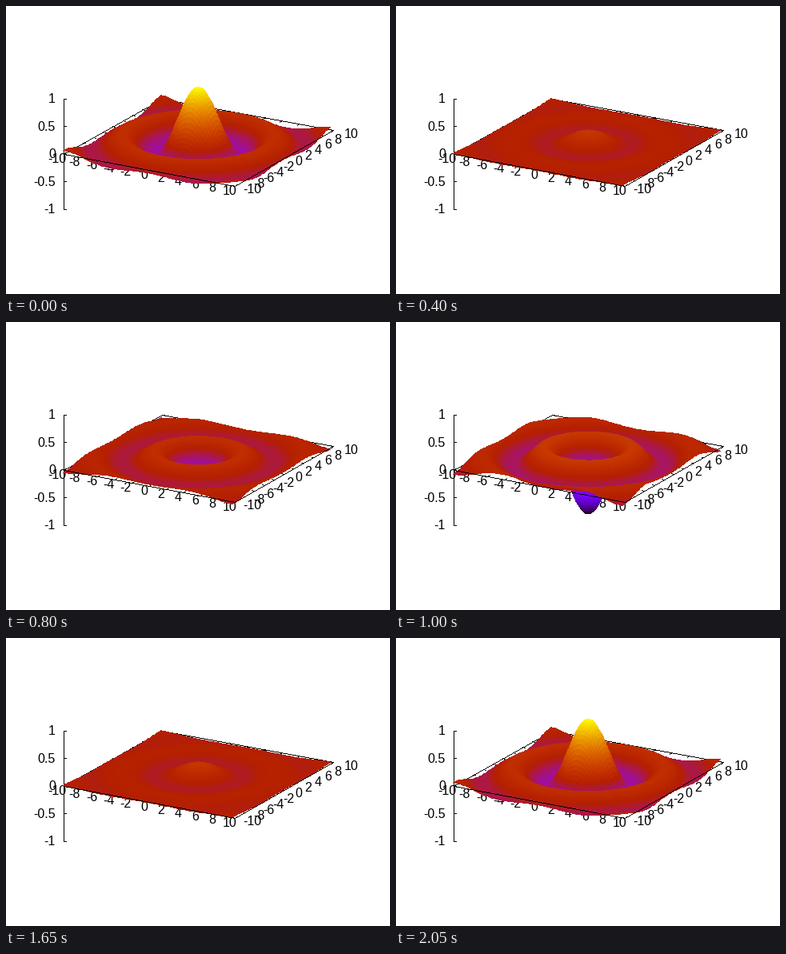
These frames come from a looping animation (480 px wide and 360 px high, 2100 ms). A matplotlib script:

```python
import numpy as np
import matplotlib.pyplot as plt
from matplotlib.animation import ArtistAnimation

W, H, DPI = 480, 360, 80
PX = 72 / DPI                       # one pixel in points
ORIGIN = np.array([71.6, 184.74])   # screen place of (-10, -10, 0)
XVEC = np.array([214.0, 39.9])      # x from -10 to 10
YVEC = np.array([123.6, -69.2])     # y from -10 to 10
ZLEN = 69.0                         # one unit of height
TICK = 3
STEPS = 21
SUB = 10                            # sample points along a cell edge
BACK, SURFACE, FRONT = 1, 2, 3

plt.rcParams["font.family"] = "Liberation Sans"
fig = plt.figure(figsize=(W / DPI, H / DPI), dpi=DPI, facecolor="white")
ax = fig.add_axes([0, 0, 1, 1])
ax.axis("off")


def project(x, y, z=0.0):
    u, v = (x + 10) / 20, (y + 10) / 20
    return (ORIGIN[0] + XVEC[0] * u + YVEC[0] * v,
            ORIGIN[1] + XVEC[1] * u + YVEC[1] * v - ZLEN * z)


def nearest(a):
    return np.floor(np.asarray(a) + 0.5).astype(int)


def show(layer, zorder):
    return ax.imshow(layer, extent=(0, W, H, 0), aspect="auto",
                     interpolation="nearest", zorder=zorder)


def palette(gray):
    g = np.clip(gray, 0, 1)
    blue = np.clip(np.sin(2 * np.pi * g), 0, 1)
    return np.stack([np.sqrt(g), g ** 3, blue, np.ones_like(g)], axis=-1)


def line(layer, p, q):
    """Hard one-pixel black line."""
    (x0, y0), (x1, y1) = nearest(p), nearest(q)
    n = max(abs(x1 - x0), abs(y1 - y0)) + 1
    layer[nearest(np.linspace(y0, y1, n)),
          nearest(np.linspace(x0, x1, n)), 3] = 1


def tick(layer, p, direction):
    d = direction / np.hypot(*direction) * TICK
    line(layer, p, (p[0] + d[0], p[1] + d[1]))


def label(x, y, value, ha):
    # Non-negative numbers carry a leading blank, as in "% h".
    blank = 2.7 if value >= 0 else 0
    x += {"left": blank, "center": blank / 2, "right": 0}[ha]
    ax.text(x, nearest(y + 5.5), f"{value:g}", size=16 * PX, ha=ha,
            va="baseline", color="black", zorder=BACK + 0.5)


def draw_box():
    rear, fore = np.zeros((2, H, W, 4))
    left, front = project(-10, -10), project(10, -10)
    right, back = project(10, 10), project(-10, 10)
    line(rear, left, back)
    line(rear, back, right)
    line(fore, left, front)
    line(fore, front, right)
    line(rear, project(-10, -10, -1), project(-10, -10, 1))

    for n in range(-10, 11, 2):
        px, py = project(n, -10)
        tick(rear, (px, py), YVEC)
        tick(rear, project(n, 10), -YVEC)
        label(px - 7.5, py + 5.76, n, "center")

        px, py = project(10, n)
        tick(rear, (px, py), -XVEC)
        tick(rear, project(-10, n), XVEC)
        label(px + 10.8, py + 3.65, n, "left")

    for z in np.linspace(-1, 1, 5):
        px, py = project(-10, -10, z)
        tick(rear, (px, py), np.array([1.0, 0.0]))
        label(62, py, z, "right")

    show(rear, BACK)
    show(fore, FRONT)


def corners(a):
    """The four corner values of every grid cell."""
    return a[:-1, :-1], a[:-1, 1:], a[1:, :-1], a[1:, 1:]


def spread(a):
    """Sample points across every cell, cell after cell."""
    p, q, r, s = (c[..., None, None] for c in corners(a))
    t = np.linspace(0, 1, SUB, dtype=np.float32)
    u, v = t[None, :], t[:, None]
    return nearest((p * (1 - u) + q * u) * (1 - v)
                   + (r * (1 - u) + s * u) * v).ravel()


# Rows run from the far side to the near side, so near cells paint last.
axis = np.arange(-10, 10, 0.2)
X, Y = np.meshgrid(axis, axis[::-1])
RIPPLE = np.sinc(np.hypot(X, Y) / np.pi)
CELLS = np.repeat(np.arange((len(axis) - 1) ** 2), SUB * SUB)


def surface(amp):
    z = amp * RIPPLE
    px, py = project(X, Y, z)
    # Cell corners sit on whole pixels.
    px = np.floor(px).astype(np.float32)
    py = np.floor(py + 0.5).astype(np.float32)
    owner = np.full((H, W), -1)
    owner[spread(py), spread(px)] = CELLS
    colors = palette((sum(corners(z)) / 4 + 1) / 2).reshape(-1, 4)
    layer = colors[owner]
    layer[owner < 0] = 0
    return show(layer, SURFACE)


draw_box()
frames = [[surface(a)] for a in np.linspace(1, -1, STEPS)]
ax.set_xlim(0, W)
ax.set_ylim(H, 0)

# Down to the inverted ripple and back, both ends held for two frames.
anim = ArtistAnimation(fig, frames + frames[::-1], interval=50, repeat=True,
                       repeat_delay=0, blit=False)
plt.show()
```
